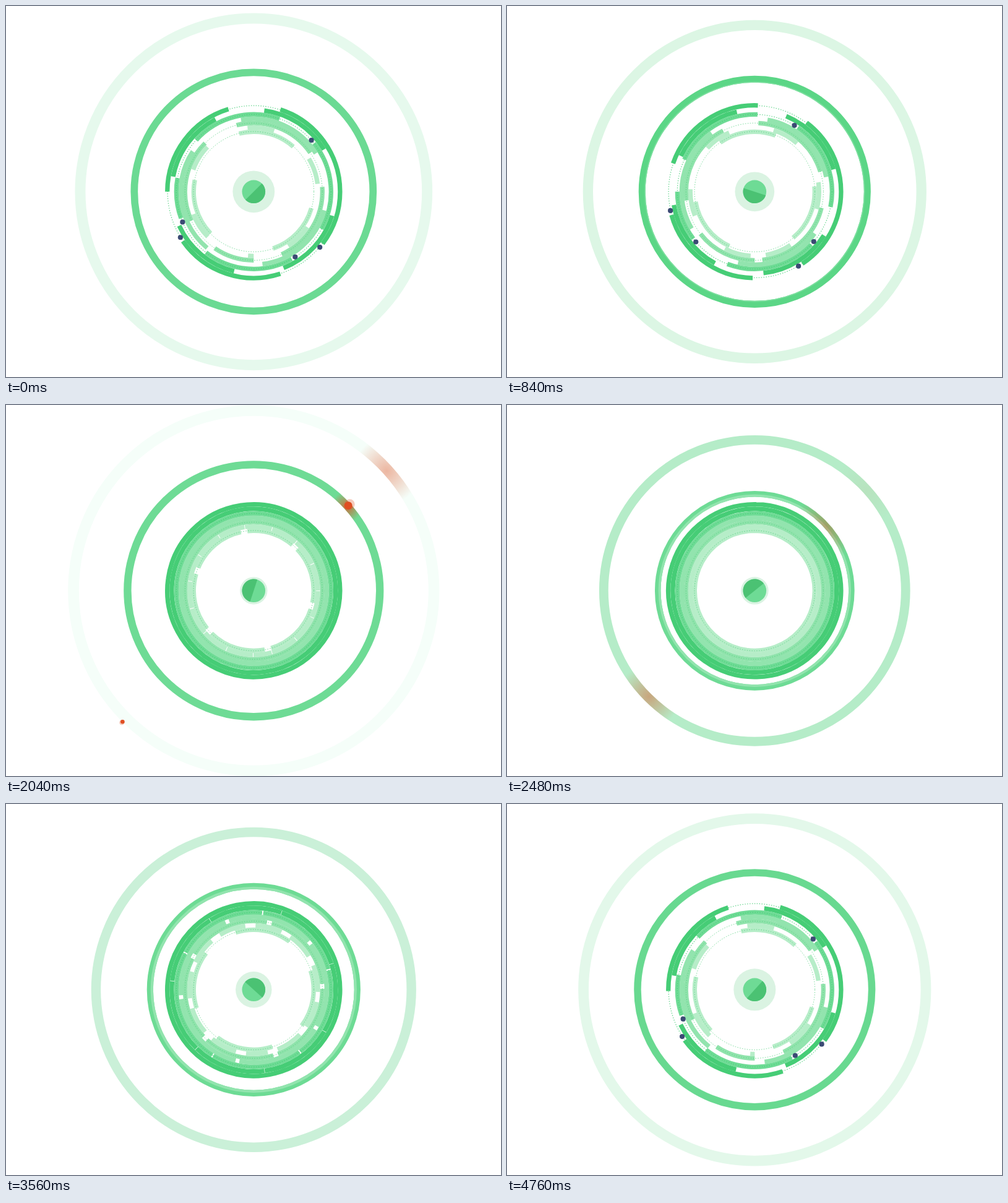
Animation of 800x600 px, one loop 4800 ms. Source, as an HTML page:

```html
<!DOCTYPE html>
<html>
<head>
<meta charset="utf-8">
<title>Radial pulse</title>
<style>
  html, body { margin: 0; width: 100%; height: 100%; overflow: hidden; background: #fff; }
  svg { display: block; width: 100vw; height: 100vh; }
</style>
</head>
<body>
<svg id="stage" viewBox="0 0 800 600"></svg>
<script>
const LOOP = 4800, CX = 400.3, CY = 300.3, RAD = Math.PI / 180;
const stage = document.getElementById('stage');

// r: radius, dash: arc length in degrees, gap: widest gap, seam: where the dash pattern begins,
// base: anchor angle, drift: travel per loop, pin: anchor shift while gaps change
const bands = [
  { r: 139.6, color: '#46cd76', dash: 73,   gap: 35,   seam: 0,   base: 288,   drift: 108,   pin: 0,    close: 710,  open: 3500 },
  { r: 132.4, color: '#46cd76', dash: 51.6, gap: 35.2, seam: 0,   base: 277.4, drift: 86.8,  pin: 0,    close: 780,  open: 3420 },
  { r: 125,   color: '#6edb95', dash: 67.5, gap: 31.8, seam: 180, base: 222,   drift: -99.3, pin: -.26, close: 850,  open: 3340 },
  { r: 118,   color: '#92e4ae', dash: 68.3, gap: 46.5, seam: 180, base: 145.2, drift: 114.8, pin: .46,  close: 920,  open: 3270 },
  { r: 111,   color: '#90e3ac', dash: 70,   gap: 30.5, seam: 90,  base: 54.5,  drift: 100.5, pin: .3,   close: 990,  open: 3190 },
  { r: 104,   color: '#b6edc8', dash: 24,   gap: 40.5, seam: 90,  base: 6.5,   drift: 129,   pin: .12,  close: 1060, open: 3120 },
  { r: 97,    color: '#b6edc8', dash: 55.3, gap: 64.7, seam: 270, base: 256,   drift: -120,  pin: -.2,  close: 1223, open: 2970 }
];
const SWEEP = 1150;

// Small dots that travel along the gaps of two bands
const dots = [
  { band: 2, i: 3, go: 4040, side: -1 },
  { band: 2, i: 5, go: 3908, side: -1 },
  { band: 2, i: 4, go: 3776, side: -1 },
  { band: 0, i: -3, go: 4172, side: 1 },
  { band: 0, i: -2, go: 4304, side: 1 }
];
dots[0].i = 1; dots[1].i = 3; dots[2].i = 2;

const sparks = [
  { angle: -42, r: 206, at: 2040, from: 1700, to: 2180, size: 6.5, glow: true },
  { angle: 135, r: 300, at: 2040, from: 2000, to: 2330, size: 3.3, glow: true },
  { angle: 114.4, r: 227, at: 2920, from: 2820, to: 2980, size: 2.6 }
];
const SPARK_SPEED = .3;

// Pulse colour by outer radius
const tones = [
  [143, 0x6edb95], [172, 0x6edb95], [187, 0x5ad685], [197, 0x6bda93], [210, 0x6edb95],
  [232, 0x92e4ae], [262, 0xc9f0d7], [277, 0xdcf6e4], [289, 0xe6f9ed], [300, 0xf5fef9], [306, 0xffffff]
];

const clamp = x => Math.max(0, Math.min(1, x));
const ease = x => { x = clamp(x); return x < .5 ? 4 * x ** 3 : 1 - 4 * (1 - x) ** 3; };
const polar = (r, a) => [CX + r * Math.cos(a * RAD), CY + r * Math.sin(a * RAD)];

function el(name, attrs, parent = stage) {
  const node = document.createElementNS('http://www.w3.org/2000/svg', name);
  set(node, attrs);
  parent.appendChild(node);
  return node;
}
function set(node, attrs) {
  for (const k in attrs) node.setAttribute(k, attrs[k]);
}
const circle = (r, attrs, parent) => el('circle', { cx: CX, cy: CY, r, fill: 'none', ...attrs }, parent);

function tone(R) {
  let k = 1;
  while (k < tones.length - 1 && tones[k][0] < R) k++;
  const [r0, c0] = tones[k - 1], [r1, c1] = tones[k];
  const p = clamp((R - r0) / (r1 - r0));
  const mix = s => Math.round((c0 >> s & 255) * (1 - p) + (c1 >> s & 255) * p);
  return `rgb(${mix(16)},${mix(8)},${mix(0)})`;
}

function arc(r, a, b) {
  const [x0, y0] = polar(r, a), [x1, y1] = polar(r, b);
  return `M${x0.toFixed(2)} ${y0.toFixed(2)}A${r} ${r} 0 0 1 ${x1.toFixed(2)} ${y1.toFixed(2)}`;
}

// Scene
const defs = el('defs', {});
const pulses = [0, 1, 2].map(j => ({
  j,
  ring: circle(0, {}),
  rim: circle(0, {}),
  glows: sparks.filter(s => s.glow).map((spark, n) => {
    const id = `glow${j}${n}`;
    const grad = el('radialGradient', { id, gradientUnits: 'userSpaceOnUse' }, defs);
    el('stop', { offset: 0, 'stop-color': '#df5226', 'stop-opacity': .8 }, grad);
    el('stop', { offset: .5, 'stop-color': '#df5226', 'stop-opacity': .42 }, grad);
    el('stop', { offset: 1, 'stop-color': '#df5226', 'stop-opacity': 0 }, grad);
    return { spark, grad, ring: circle(0, { stroke: `url(#${id})` }) };
  })
}));
const core = el('g', {});
for (const b of bands) b.path = el('path', { fill: 'none', stroke: b.color, 'stroke-width': 7.3 }, core);
for (const r of [139.2, 125, 111, 97.3])
  circle(r, { stroke: '#46cd76', 'stroke-width': r > 120 ? 1.2 : .9, 'stroke-dasharray': '1.5 2.4', opacity: .85 }, core);
for (const d of dots) d.node = circle(0, { fill: '#3b4a74' }, core);
const halo = circle(30, { fill: '#daf3e2' }, core);
circle(18.8, { fill: '#6edb95' }, core);
const half = el('path', {
  d: `M${CX} ${CY - 18.8}A18.8 18.8 0 0 1 ${CX} ${CY + 18.8}Z`, fill: '#4bc273'
}, core);
for (const s of sparks) {
  s.haze = circle(0, { fill: '#df5226', opacity: .3 });
  s.node = circle(0, { fill: '#e04e22' });
}

const sparkRadius = (s, t) => s.r - (t - s.at) * SPARK_SPEED;

function drawPulses(t) {
  const phase = t % 960;
  for (const p of pulses) {
    const R = 108.75 + phase * .09375 + 90 * p.j;
    const shown = R > 142.7 && R < 306;
    const w = R * .0588, mid = R - w / 2;
    set(p.ring, { r: mid, 'stroke-width': w, stroke: tone(R), opacity: +shown });
    const rim = 4.2 * clamp((196 - R) / 22) * clamp((R - 143) / 20);
    set(p.rim, {
      r: R - w + rim / 2, 'stroke-width': rim,
      stroke: R < 180 ? '#92e4ae' : '#7ddf9f', opacity: shown && rim > .1 ? 1 : 0
    });
    for (const g of p.glows) {
      // time since the spark met this ring
      const age = (mid - sparkRadius(g.spark, t)) / (SPARK_SPEED + .09375) + 12;
      const level = shown && t > g.spark.from && age > 0 ? clamp(1 - age / 480) : 0;
      const [cx, cy] = polar(mid - 2, g.spark.angle);
      set(g.grad, { cx, cy, r: 24 + Math.min(32, age > 0 ? age * .13 : 0) });
      set(g.ring, { r: mid, 'stroke-width': w, opacity: level });
    }
  }
}

function drawBands(t) {
  for (const b of bands) {
    const wide = 1 - ease((t - b.close) / SWEEP) + ease((t - b.open) / SWEEP);
    b.now = b.gap * wide;
    b.step = b.dash + b.now;
    b.start = b.base + b.drift * t / LOOP + b.pin * (b.gap - b.now);
    const end = b.seam + 360, extra = b.now < .08 ? .25 : 0;
    let d = '';
    for (let i = Math.floor((b.seam - b.start) / b.step) - 1; b.start + i * b.step < end; i++) {
      const a = b.start + i * b.step;
      const from = Math.max(a, b.seam), to = Math.min(a + b.dash + extra, end + extra);
      if (to > from) d += arc(b.r, from, to);
    }
    b.path.setAttribute('d', d);
  }
}

function drawDots(t) {
  for (const d of dots) {
    const b = bands[d.band], late = t > 2400;
    const q = late ? ease((t - d.go) / 450) : 1;
    const i = d.i + (late ? -d.side : 0);
    const a = b.start + i * b.step;
    const room = (1 - q) * Math.max(0, b.now - 6);
    const at = d.side < 0 ? a - 3 - room : a + b.dash + 3 + room;
    const [cx, cy] = polar(b.r, at);
    set(d.node, { cx, cy, r: 4.1 * Math.min(1, q * 10) * clamp(b.now / 14) });
  }
}

function drawCore(t) {
  const size = t < 2330 ? 33.9 - 11.9 * ease(t / 2400)
                        : 22 + 12 * (1 - Math.cos(Math.PI * clamp((t - 2260) / 2300))) / 2;
  halo.setAttribute('r', size);
  half.setAttribute('transform', `rotate(${45 + 360 * t / LOOP} ${CX} ${CY})`);
  const push = clamp(1 - Math.abs(t - 2920) / 120);
  core.setAttribute('transform', `translate(${push} 0)`);
}

function drawSparks(t) {
  for (const s of sparks) {
    const live = t >= s.from && t <= s.to;
    const size = live ? s.size * clamp((t - s.from) / 40) * clamp((s.to - t) / 80) : 0;
    const [cx, cy] = polar(sparkRadius(s, t), s.angle);
    const [hx, hy] = polar(sparkRadius(s, t) + size * .5, s.angle);
    set(s.node, { cx, cy, r: size });
    set(s.haze, { cx: hx, cy: hy, r: size * 1.25 });
  }
}

function draw(t) {
  drawPulses(t);
  drawBands(t);
  drawDots(t);
  drawCore(t);
  drawSparks(t);
}

const began = performance.now();
function tick() {
  draw((performance.now() - began) % LOOP);
  requestAnimationFrame(tick);
}
draw(0);
requestAnimationFrame(tick);
</script>
</body>
</html>
```
